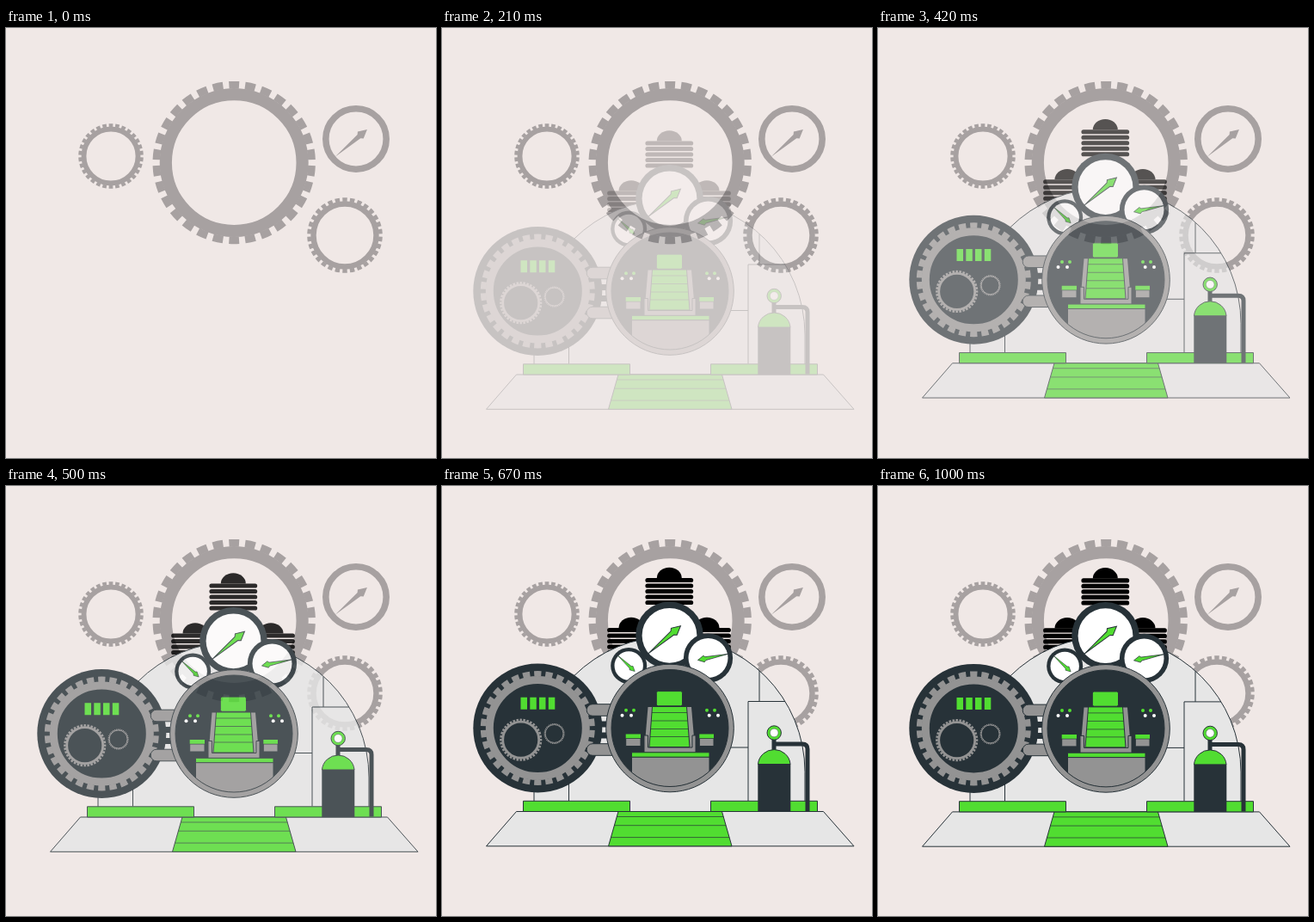
Recreate the animation shown at these times as an HTML page. Size 500x500 px, loop 1.04 s.

```html
<!DOCTYPE html>
<html lang="en">
<head>
<meta charset="utf-8">
<title>Time machine</title>
<style>
html, body { margin: 0; width: 100%; height: 100%; overflow: hidden; background: #f0e8e6; }
svg { display: block; width: 100vw; height: 100vh; }
.dark { fill: #273238; }
.gray { fill: #939393; }
.green { fill: #51dd31; }
.pale { fill: #e6e6e6; }
.white { fill: #fff; }
.line { stroke: #273238; stroke-width: 1; }
.wire { fill: none; stroke: #273238; stroke-width: 1; }
.thin { fill: none; stroke: #273238; stroke-width: .7; }
.pipe { fill: none; stroke: #273238; stroke-width: 5; }
</style>
</head>
<body>
<svg viewBox="0 0 500 500">
  <defs>
    <path id="needle" d="M-32 0L4.5-2.8L7-5.2L17 0L7 5.2L4.5 2.8Z"/>
    <g id="bulb">
      <path d="M-14.5 12A14.5 12.3 0 0 1 14.5 12Z"/>
      <path d="M-25.3 14.5h50.6m-50.6 6.5h50.6m-50.6 6.5h50.6m-50.6 6.5h50.6m-50.6 6.5h50.6"
        fill="none" stroke="#000" stroke-width="5.2" stroke-linecap="round"/>
    </g>
    <clipPath id="porthole"><circle cx="265" cy="281.5" r="68"/></clipPath>
  </defs>

  <g id="backdrop">
    <circle cx="407" cy="129" r="35.2" fill="none" stroke="#a7a1a1" stroke-width="7.6"/>
    <use href="#needle" transform="translate(407 129) rotate(-40.5)" fill="#a7a1a1"/>
  </g>

  <g id="machine" opacity="0">
    <use href="#bulb" x="264.3" y="95"/>
    <use href="#bulb" x="220" y="153"/>
    <use href="#bulb" x="308" y="153"/>

    <path class="pale line" d="M107 378.5V332.5A157.5 157.5 0 0 1 422 332.5V378.5Z"/>
    <path class="wire" d="M369 215V250.5M399 250.5H356V366M336 304H356M147.5 300V366"/>

    <path class="pale line" d="M86.5 378.5H443.5L479 418.8H51.5Z"/>
    <path class="green line" d="M205 378.5H325.5L337 418.8H193.5Z"/>
    <path class="thin" d="M203.3 384.5H327.2M200.3 394.7H330.1M196.4 408.6H334.1"/>
    <path class="green line" d="M94.5 366.3H218.5V378.5H94.5ZM312.5 366.3H436.5V378.5H312.5Z"/>

    <path class="pipe" d="M386 293V308M386 300H419Q425 300 425 306V378"/>
    <path class="dark" d="M367.3 323H405.3V378.5H367.3Z"/>
    <path class="green line" d="M367.5 323.5A18.8 18.3 0 0 1 405 323.5Z"/>
    <circle class="green line" cx="386.2" cy="287" r="8.2"/>
    <circle class="white line" cx="386.2" cy="287" r="4.8" stroke-opacity=".4"/>

    <g id="gauges"></g>

    <g id="door">
      <circle class="dark" cx="111.3" cy="281.5" r="75"/>
    </g>
    <path class="dark" d="M180 273.5H194V280.5H180ZM180 286.5H194V293.5H180Z"/>
    <path class="gray line" d="M200 253.7H175A6.8 6.8 0 0 0 175 267.3H200ZM200 299.7H175A6.8 6.8 0 0 0 175 313.3H200Z"/>
    <path class="green" d="M91.5 245.7h7.5v14h-7.5zM102.3 245.7h7.5v14h-7.5zM113 245.7h7.5v14h-7.5zM123.8 245.7h7.5v14h-7.5z"/>

    <circle class="gray line" cx="265" cy="281.5" r="74.3"/>
    <circle class="dark" cx="265" cy="281.5" r="68"/>
    <g clip-path="url(#porthole)">
      <path class="gray" d="M239.5 257H290L294.5 310H235Z"/>
      <path class="gray line" d="M235 290H239.5V304H291V290H295V310H235Z"/>
      <path class="gray line" d="M220.5 315H311V352H220.5Z"/>
      <path class="green line" d="M220.5 309.8H311V315.2H220.5Z"/>
      <path class="green line" d="M244.5 256.5H284.5L288 303.5H241Z"/>
      <path class="thin" d="M244 263.5H285M243.3 273H285.7M242.6 282.5H286.4M242 291.5H287.2"/>
      <rect class="green line" x="249.3" y="238.6" width="30.2" height="17.2" rx="2"/>
      <path class="gray line" d="M213.7 293.5H231V302.5H213.7ZM299.3 293.5H316V302.5H299.3Z"/>
      <path class="green" d="M213.7 288.5H231V293.3H213.7ZM299.3 288.5H316V293.3H299.3Z"/>
    </g>
    <g id="lamps"></g>
    <circle class="wire" cx="265" cy="281.5" r="68"/>
  </g>
</svg>
<script>
const NS = "http://www.w3.org/2000/svg";
const $ = id => document.getElementById(id);

function add(parent, tag, attrs) {
  const el = document.createElementNS(NS, tag);
  for (const k in attrs) el.setAttribute(k, attrs[k]);
  return parent.appendChild(el);
}

function ring(parent, cx, cy, inner, outer, stroke, extra) {
  add(parent, "circle", {
    cx, cy, r: (inner + outer) / 2, fill: "none", stroke,
    "stroke-width": outer - inner, ...extra
  });
}

// A solid ring plus a dashed ring whose dashes are the teeth, one of them at the top.
function gear(parent, cx, cy, inner, body, outer, teeth, color) {
  ring(parent, cx, cy, inner, body, color);
  ring(parent, cx, cy, body - .5, outer, color, {
    pathLength: teeth, "stroke-dasharray": ".63 .37", "stroke-dashoffset": .315,
    transform: `rotate(-90 ${cx} ${cy})`
  });
}

function gauge(cx, cy, r, rim, angle, scale) {
  const g = $("gauges");
  add(g, "circle", { cx, cy, r, class: "dark" });
  add(g, "circle", { cx, cy, r: r - rim, class: "white" });
  add(g, "use", {
    href: "#needle", class: "green line",
    transform: `translate(${cx} ${cy}) rotate(${angle}) scale(${scale})`
  });
}

const STONE = "#a7a1a1", STEEL = "#939393";
gear($("backdrop"), 265.2, 156.6, 72.3, 86.5, 94.7, 30, STONE);
gear($("backdrop"), 122, 149, 28.6, 34.4, 37.8, 30, STONE);
gear($("backdrop"), 394, 241, 33.3, 39.7, 43.8, 30, STONE);
gear($("door"), 111.3, 281.5, 51.5, 60.5, 66.5, 30, STEEL);
gear($("door"), 91.7, 295.2, 19.6, 22.4, 24.6, 36, STEEL);
gear($("door"), 130.6, 288, 10, 10.9, 12, 36, STEEL);

gauge(264.5, 173.8, 39.3, 7.4, -40.5, 1);
gauge(309.5, 200, 28.6, 5.6, 168.5, .72);
gauge(217.2, 209, 21, 4.3, 43, .56);

const lamps = { green: [[214, 260.7], [223, 260.7], [308, 260.7], [317, 260.7]],
                white: [[209.5, 266.7], [220, 266.7], [310.7, 266.7], [321, 266.7]] };
for (const color in lamps)
  for (const [cx, cy] of lamps[color]) add($("lamps"), "circle", { cx, cy, r: 2, class: color });

// Rise of the machine: [step, vertical offset], joined by a smooth curve.
const rise = [[3, 27.3], [5, 24.5], [8, 16.5], [12, 6.5], [16, 0], [20, -1.4], [24, .4]];

function slope(i) {
  const a = rise[Math.max(i - 1, 0)], b = rise[Math.min(i + 1, rise.length - 1)];
  return (b[1] - a[1]) / (b[0] - a[0]);
}

function offset(step) {
  let i = 0;
  while (i < rise.length - 2 && step > rise[i + 1][0]) i++;
  const [x0, y0] = rise[i], [x1, y1] = rise[i + 1];
  const h = x1 - x0, u = (step - x0) / h, v = 1 - u;
  return v * v * (1 + 2 * u) * y0 + u * u * (3 - 2 * u) * y1
    + h * u * v * (v * slope(i) - u * slope(i + 1));
}

const LOOP = 1040, STEPS_PER_10MS = .24;

function draw(now) {
  const t = now % LOOP;
  const step = Math.floor((Math.floor(t / 10) + .49) * STEPS_PER_10MS);
  const shown = step >= 3;
  const alpha = shown ? Math.min(1, (step - 2.7) * .0875) : 0;
  $("machine").setAttribute("opacity", alpha);
  if (shown) $("machine").setAttribute("transform", `translate(0 ${offset(step).toFixed(2)})`);
}

const start = performance.now();
function tick() {
  draw(performance.now() - start);
  requestAnimationFrame(tick);
}
tick();
</script>
</body>
</html>
```
